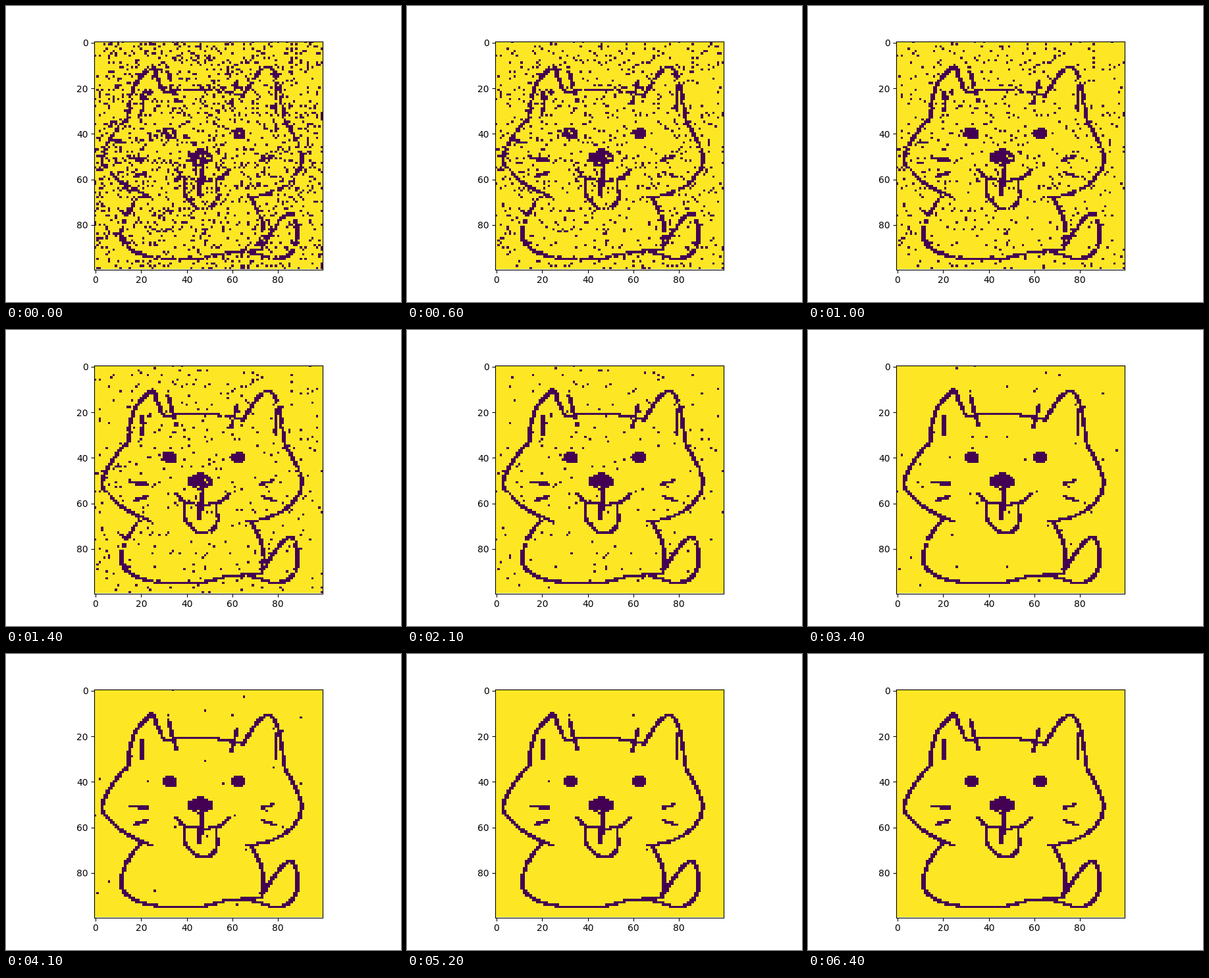
These frames come from a looping animation (600 by 450 pixels, 6500 ms). A matplotlib script:

```python
import numpy as np
import matplotlib.pyplot as plt
from matplotlib.animation import FuncAnimation

N = 100        # cells per side
FRAMES = 65
TAU = 9.7      # mean settling time in frames
NOISE = 0.16   # share of cells flipped at the start

EAR_LEFT = [(25, 10), (18.5, 17), (15, 25.5), (14.6, 32.5)]
CHEEK_LEFT = [(14.6, 32.5), (8.7, 39.7), (3.8, 48), (4, 54.3), (12.7, 62.4), (24.3, 68)]
BROW = [(25, 10), (28, 17.5), (30.5, 21.6), (38, 21), (50.3, 21), (57.5, 22.2), (65, 23.6)]
EAR_RIGHT = [(65, 23.6), (69.5, 16), (75, 11), (79.4, 15), (81.7, 25.7), (83, 34.5)]
CHEEK_RIGHT = [(83, 34.5), (87.7, 43), (90.3, 51.7), (86.3, 60), (77, 66), (66.4, 68.3)]
BODY = [(20, 67), (13.3, 76.3), (11.4, 86), (17, 91.8), (29, 94.8), (47, 94.7),
        (57.5, 92.2), (71.3, 91)]
BACK = [(68.5, 68.5), (72.7, 77.7), (73.4, 85), (72.2, 91)]
TAIL = [(72.2, 91), (78.3, 81.5), (83.1, 76), (87, 76.2), (88.7, 85), (86.2, 91.8),
        (79.4, 95), (66, 91.4)]
TONGUE = [(38.8, 59.5), (39.5, 67.6), (46.5, 73.4), (52.8, 70), (53, 60.5)]
MOUTH = [(35.3, 55.7), (38.7, 59.4), (42, 60.2), (52.5, 60.2), (58.8, 56)]
CURVES = [EAR_LEFT, CHEEK_LEFT, BROW, EAR_RIGHT, CHEEK_RIGHT, BODY, BACK, TAIL,
          TONGUE, MOUTH]

EAR_LINES = [[(32, 13), (35.4, 26)], [(61.9, 17), (59.5, 27)],
             [(20.5, 22), (20.5, 30)], [(79, 19), (79, 30)]]
WHISKERS = [[(15, 51), (23, 51)], [(19, 52), (23, 52)], [(17, 59), (23, 57)],
            [(73, 51.6), (78, 50.2)], [(73, 57), (79, 59.4)]]
STEM = [[(46.5, 54), (46.5, 63)], [(45.5, 60), (45.5, 67)]]


def spline(pts, steps=150):
    """Catmull-Rom curve through the points."""
    p = np.array(pts, dtype=float)
    p = np.vstack([2 * p[0] - p[1], p, 2 * p[-1] - p[-2]])
    t = np.linspace(0, 1, steps)[:, None]
    parts = []
    for a, b, c, d in zip(p, p[1:], p[2:], p[3:]):
        parts.append(b + 0.5 * t * (c - a + t * (
            2 * a - 5 * b + 4 * c - d + t * (3 * (b - c) + d - a))))
    return np.vstack(parts)


def stroke(grid, pts):
    """Mark the cells along a curve, a little wider across than down."""
    x, y = spline(pts).T
    for shift in (-0.25, 0.25):
        cols = np.rint(x + shift).astype(int)
        grid[np.rint(y).astype(int), cols] = 0


def ellipse(grid, cx, cy, rx, ry):
    y, x = np.mgrid[:N, :N]
    grid[((x - cx) / rx) ** 2 + ((y - cy) / ry) ** 2 <= 1] = 0


def make_cat():
    grid = np.ones((N, N), dtype=int)
    for pts in CURVES + EAR_LINES + WHISKERS + STEM:
        stroke(grid, pts)
    for cx in (32.5, 62.5):
        ellipse(grid, cx, 40, 3, 2.4)
    ellipse(grid, 46, 50.5, 5.55, 3.6)
    grid[53, 45] = 1    # glint below the nose
    return grid


cat = make_cat()

# Each flipped cell returns to its clean value after a random wait
rng = np.random.default_rng(12)
flipped = rng.random((N, N)) < NOISE
wait = np.minimum(rng.exponential(TAU, (N, N)), FRAMES - 1)

fig, ax = plt.subplots(figsize=(6, 4.5), dpi=100)
image = ax.imshow(cat, cmap="viridis", vmin=0, vmax=1, interpolation="nearest")


def update(frame):
    image.set_data(np.where(flipped & (wait > frame), 1 - cat, cat))
    return [image]


anim = FuncAnimation(fig, update, frames=FRAMES, interval=100,
                     repeat=True, repeat_delay=0)
plt.show()
```
